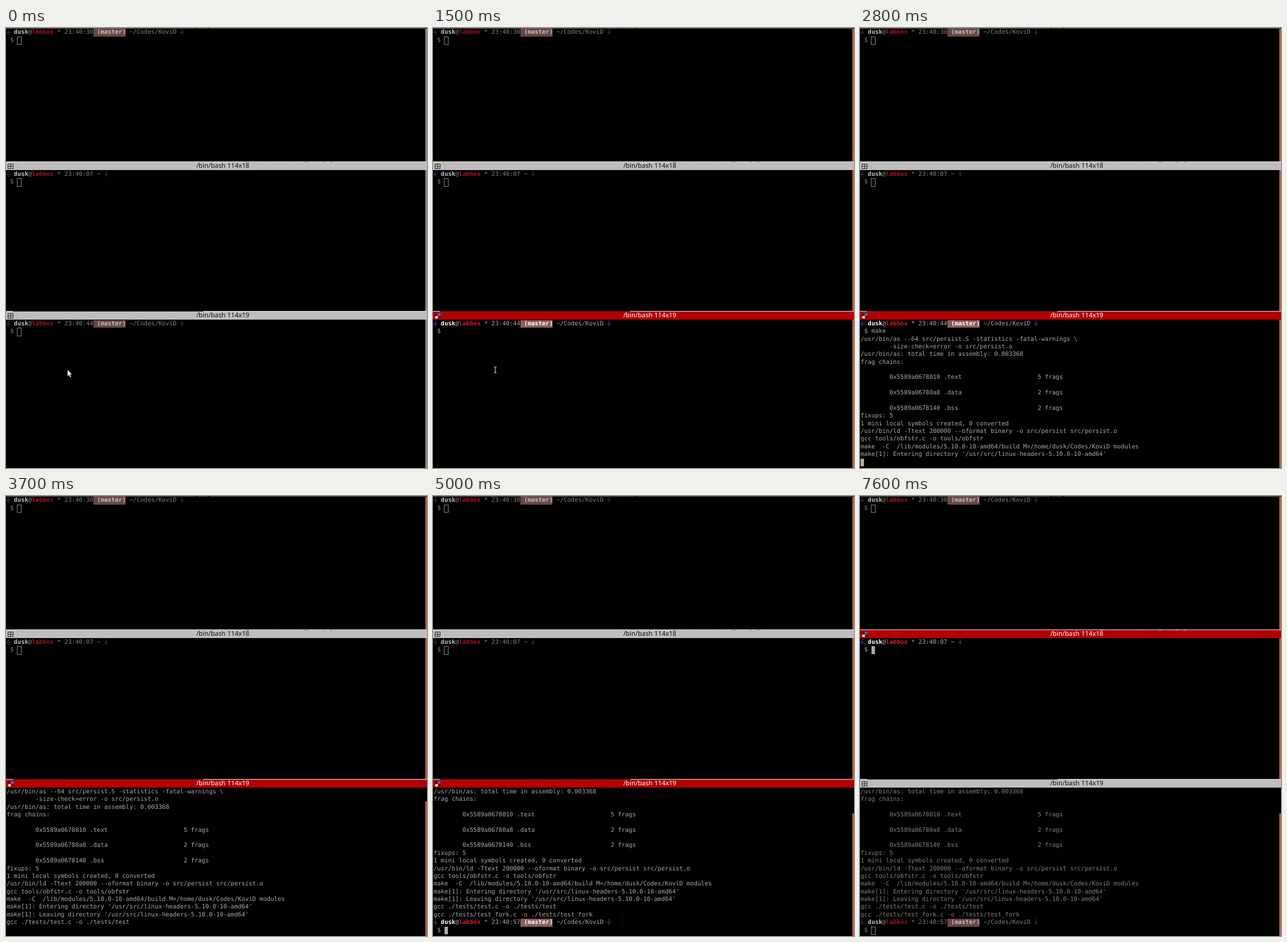
An HTML page that plays this animation: 732 by 765 pixels, repeating every 8 s.

```html
<!DOCTYPE html>
<html lang="en">
<head>
<meta charset="utf-8">
<title>Terminal build</title>
<style>
  :root { --cell: 6.29px; --row: 13.39px; }
  html, body { margin: 0; width: 100%; height: 100%; overflow: hidden; background: #000; }
  #stage { position: absolute; left: 0; top: 0; width: 732px; height: 765px; overflow: hidden; background: #000; }

  .pane {
    --fg: #818181; --strong: #c2c2c2; --host: #a3141f; --frame: #36368c; --badge: #694647;
    --bar: #bfbebc; --title: #111;
    position: absolute; left: 0; width: 732px;
  }
  .pane.focus {
    --fg: #aaa; --strong: #fff; --host: #d61c29; --frame: #4848b8; --badge: #8b5c5d;
    --bar: #b30004; --title: #fff;
  }
  .screen {
    position: absolute; left: 1px; top: 0; color: var(--fg);
    font: 10.45px/var(--row) "DejaVu Sans Mono", monospace;
    text-rendering: geometricPrecision; white-space: pre;
  }
  .row { position: relative; height: var(--row); }
  .row b { color: var(--strong); }
  .row .host { color: var(--host); }
  .row s { color: var(--frame); text-decoration-thickness: 1px; }
  .row .badge { display: inline-block; height: var(--row); background: var(--badge); vertical-align: top; }
  .cursor {
    position: absolute; top: 0; box-sizing: border-box; height: calc(var(--row) + 1px);
    width: calc(var(--cell) + 1.4px); margin-left: -.7px; border: 1px solid #858585;
  }
  .focus .cursor { width: var(--cell); height: var(--row); margin-left: 0; border: 0; background: #aaa; }
  .focus .cursor.off { visibility: hidden; }

  .bar { position: absolute; left: 0; top: -14.8px; width: 732px; height: 14px; background: var(--bar); }
  .bar::before { content: ""; position: absolute; left: 0; top: -1px; width: 100%; height: 1px; background: #e4e4e4; }
  .bar .title {
    position: absolute; left: 22px; right: 0; top: 0; text-align: center; color: var(--title);
    font: 11.3px/14px "Noto Sans", sans-serif; text-rendering: geometricPrecision;
  }
  .bar svg { position: absolute; left: 0; top: 0; }
  .bar .live, .focus .bar .idle { display: none; }
  .focus .bar .live { display: inline; }

  .thumb { position: absolute; right: 0; width: 3px; bottom: 0; background: var(--thumb); }
  #topline { position: absolute; left: 0; top: 0; width: 729px; height: 1px; }
  #pointer { position: absolute; left: 0; top: 0; }
</style>
</head>
<body>
<div id="stage">
  <div id="topline"></div>
  <svg id="pointer" width="732" height="765">
    <path id="arrow" d="M107 594v11.6l2.6-2.4 1.9 4.2 1.9-.9-1.9-4.1h3.2z" fill="#fff" stroke="#222" stroke-width=".5"/>
    <path id="beam" d="M106 589.5h1.6l.7.6.7-.6h1.6M106 599.2h1.6l.7-.6.7.6h1.6M108.3 590v8.8" fill="none" stroke="#ddd" stroke-width="1.1"/>
  </svg>
</div>
<script>
const LOOP = 8000, ROWS = 19, USER = 'dusk', HOST = 'labbox';
const stage = document.getElementById('stage');

const prompt = (time, path, branch = '') =>
  `<s>[</s> <b>${USER}</b>@<b class="host">${HOST}</b> * ${time}` +
  (branch && `<b class="badge"> (${branch})</b>`) + ` ${path} <s>]</s>`;
const project = time => prompt(time, '~/Codes/KoviD', 'master');
const chain = (address, section, count) =>
  `        ${address} ${section}`.padEnd(49) + `${count} frags`;

const output = [
  '/usr/bin/as --64 src/persist.S -statistics -fatal-warnings \\',
  '        -size-check=error -o src/persist.o',
  '/usr/bin/as: total time in assembly: 0.003368',
  'frag chains:',
  '',
  chain('0x5589a0678010', '.text', 5),
  '',
  chain('0x5589a06780a8', '.data', 2),
  '',
  chain('0x5589a0678140', '.bss', 2),
  'fixups: 5',
  '1 mini local symbols created, 0 converted',
  '/usr/bin/ld -Ttext 200000 --oformat binary -o src/persist src/persist.o',
  'gcc tools/obfstr.c -o tools/obfstr',
  `make  -C  /lib/modules/5.10.0-10-amd64/build M=/home/${USER}/Codes/KoviD modules`,
  "make[1]: Entering directory '/usr/src/linux-headers-5.10.0-10-amd64'",
  "make[1]: Leaving directory '/usr/src/linux-headers-5.10.0-10-amd64'",
  'gcc ./tests/test.c -o ./tests/test',
  'gcc ./tests/test_fork.c -o ./tests/test_fork'
];

// Each track lists [start ms, value]; values hold until the next start.
const tracks = {
  focus: [[0, -1], [800, 0], [900, 2], [7600, 1]],
  pointer: [[0, 'arrow'], [100, 'beam'], [1900, '']],
  thumb: [[0, '#858585'], [900, '#b55c42']],
  typed: [[0, 0], [1900, 2], [2200, 3], [2300, 4]],
  printed: [[0, -1], [2700, 0], [2800, 16], [3700, 18], [3800, 19]],
  done: [[0, false], [3900, true]],
  lit: [[0, true], [1500, false], [1700, true], [3200, false], [3900, true], [4500, false],
    [5000, true], [5700, false], [6200, true], [6900, false], [7000, true]]
};
const sample = t => Object.fromEntries(Object.entries(tracks).map(
  ([name, steps]) => [name, steps.filter(([start]) => start <= t).pop()[1]]));

const icons = `<svg width="24" height="14">
  <g class="idle"><path d="M20 1v12" stroke="#aaa9a7"/>
    <path d="M3.5 3.5h9v8h-9zM8 3.5v8M3.5 7.5h9" fill="none" stroke="#222"/>
    <path d="M9 9h5v5h-5z" fill="#bfbebc"/><path d="M9.5 10h4l-2 2.5z" fill="#222"/></g>
  <g class="live"><path d="M3 3h5v4h-5zM9 8h4v4h-4z" fill="#5c0810"/>
    <path d="M8 3h5v4.5h-5z" fill="#2878b0"/><path d="M4 8h4.5v4h-4.5z" fill="#eee"/></g></svg>`;

function addPane(top, height, title) {
  const pane = document.createElement('div');
  pane.className = 'pane';
  pane.style.cssText = `top:${top}px;height:${height}px`;
  pane.innerHTML = (title ? `<div class="bar">${icons}<div class="title">${title}</div></div>` : '') +
    '<div class="thumb" style="top:-.8px"></div><div class="screen"></div>';
  stage.insertBefore(pane, document.getElementById('pointer'));
  return pane;
}
function addMark(pane, x, width, y, color) {
  const mark = document.createElement('div');
  mark.style.cssText = `position:absolute;left:${x}px;top:${y}px;width:${width}px;height:1px;background:${color}`;
  pane.append(mark);
}
function show(pane, lines, lit = true) {
  const last = lines.length - 1;
  pane.querySelector('.screen').innerHTML = lines.map((line, i) => `<div class="row">${line}` +
    (i === last ? `<i class="cursor${lit ? '' : ' off'}"></i>` : '') + '</div>').join('');
}

const panes = [
  addPane(1.3, 231),
  addPane(247.8, 244.4, '/bin/bash 114x18'),
  addPane(507.8, 257.2, '/bin/bash 114x19')
];
show(panes[0], [project('23:40:30'), ' $ ']);
show(panes[1], [prompt('23:40:07', '~'), ' $ ']);
for (const [x, w] of [[417, 6], [450, 1], [492, 1], [519, 7], [536, 1], [550, 4], [563, 5]])
  addMark(panes[1], x, w, -14.8, '#777');
addMark(panes[2], 12, 331, -15.8, '#33252b');

function transcript(s) {
  const lines = [project('23:40:44'), ' $ ' + 'make'.slice(0, s.typed)];
  if (s.printed >= 0) lines.push(...output.slice(0, s.printed));
  if (s.done) lines.push(project('23:40:57'), ' $ ');
  else if (s.printed >= 0) lines.push('');
  return lines;
}

let shown = '';
function draw(s) {
  const lines = transcript(s);
  const scrolled = Math.max(0, lines.length - ROWS);
  panes.forEach((pane, i) => pane.classList.toggle('focus', i === s.focus));
  show(panes[2], lines.slice(scrolled), s.lit);
  panes[2].querySelector('.thumb').style.top = `calc(${100 * scrolled / lines.length}% - .8px)`;
  stage.style.setProperty('--thumb', s.thumb);
  document.getElementById('topline').style.background = s.focus === 0
    ? 'linear-gradient(90deg,#a00008 330px,#bbb 330px 332px,#a00008 332px 352px,#bbb 352px 354px,#a00008 354px)'
    : 'linear-gradient(90deg,#666 331px,#111 331px 333px,#666 333px 352px,#111 352px 354px,#666 354px)';
  for (const id of ['arrow', 'beam'])
    document.getElementById(id).style.display = s.pointer === id ? '' : 'none';
}

const start = performance.now();
function tick() {
  const state = sample((performance.now() - start) % LOOP);
  const key = JSON.stringify(state);
  if (key !== shown) {
    shown = key;
    draw(state);
  }
  requestAnimationFrame(tick);
}
tick();
</script>
</body>
</html>
```
